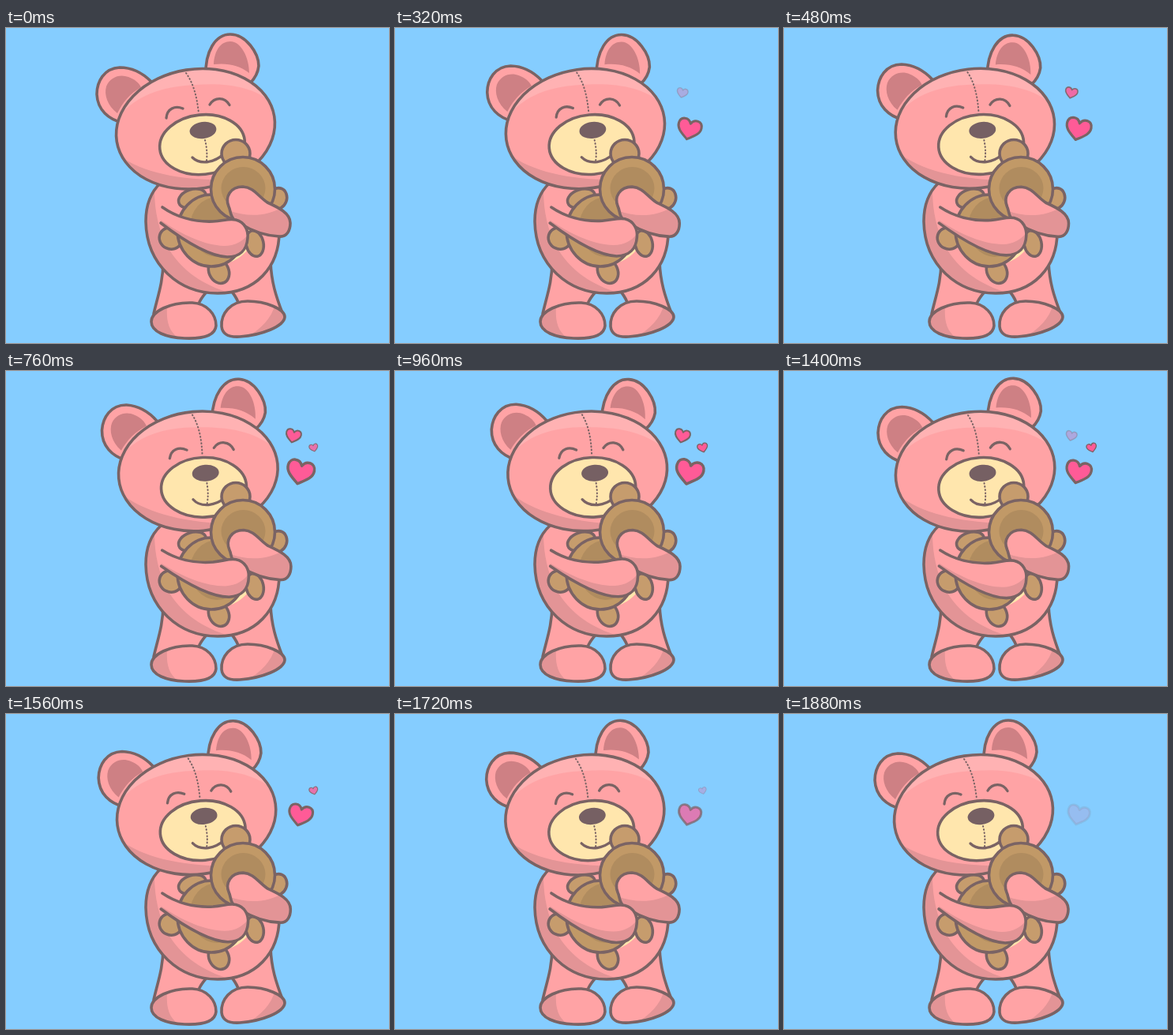
An HTML page with a canvas that plays this animation: 485x399 px, repeating every 1920 ms.

```html
<!DOCTYPE html>
<html lang="en">
<head>
<meta charset="utf-8">
<title>Bear hug</title>
<style>
html, body { margin: 0; width: 100%; height: 100%; overflow: hidden; background: #85cdff; }
canvas { display: block; }
</style>
</head>
<body>
<canvas id="stage" width="485" height="399"></canvas>
<script>
const ctx = document.getElementById('stage').getContext('2d');
const LOOP = 1920, STEP = 40;
const SKY = '#85cdff', LINE = '#7a6364', PINK = '#ffa3a5', LIGHT = '#ffb2b3', SHADE = '#e39496',
      EAR = '#ce8084', CREAM = '#ffe6ad', TAN = '#c69c6d', BROWN = '#c19967',
      DARK = '#b08c5f', ROSE = '#ff5b97';

const path = d => new Path2D(d);
function oval(x, y, rx, ry = rx, deg = 0) {
  const p = new Path2D();
  p.ellipse(x, y, rx, ry, deg * Math.PI / 180, 0, Math.PI * 2);
  return p;
}
function line(p, width = 3.6, dash = []) {
  ctx.strokeStyle = LINE;
  ctx.lineWidth = width;
  ctx.setLineDash(dash);
  ctx.stroke(p);
  ctx.setLineDash([]);
}
function fill(p, color) {
  ctx.fillStyle = color;
  ctx.fill(p);
}
// Fill, inner patches clipped to the shape, then its outline
function shape(p, color, patches = [], edge = p) {
  fill(p, color);
  ctx.save();
  ctx.clip(p);
  for (const [q, c] of patches) fill(q, c);
  ctx.restore();
  line(edge);
}
function turned(deg, x, y, draw) {
  ctx.save();
  ctx.translate(x, y);
  ctx.rotate(deg * Math.PI / 180);
  ctx.translate(-x, -y);
  draw();
  ctx.restore();
}

const legL = path('M199 296 C199 322 192 340 187 362 L240 366 C241 351 247 341 258 330 Z');
const legR = path('M335 296 C336 322 342 340 350 361 L296 366 C298 351 292 341 283 330 Z');
const footL = path('M184 372 C184 359 208 347 236 348 C255 349 266 363 266 377 C265 389 252 394 226 393 C203 392 184 385 184 372 Z');
const footR = path('M273 378 C272 362 284 346 306 346 C329 346 353 356 353 366 C352 378 324 389 296 391 C280 392 274 387 273 378 Z');
const footShadeL = path('M180 350 L204 350 C203 370 204 386 225 397 L180 397 Z');
const footShadeR = path('M358 347 L341 350 C335 370 322 382 300 395 L358 395 Z');

const body = path('M196 196 C183 208 177 225 177 245 C178 301 220 336 268 336 C316 336 346 303 346 258 C346 224 326 190 262 178 Z');
const bodyShade = path('M170 190 L188 200 C187 263 212 316 288 337 L288 345 L170 345 Z');

function lower() {
  shape(legL, PINK);
  shape(legR, PINK);
  shape(footL, PINK, [[footShadeL, SHADE]]);
  shape(footR, PINK, [[footShadeR, SHADE]]);
  shape(body, PINK, [[bodyShade, SHADE], [oval(265, 255, 50, 45), CREAM]]);
}

const earL = path('M184 68 C172 56 158 50 144 50 C124 51 115 68 115 84 C116 104 130 116 148 120 Z');
const earInL = path('M141 108 C128 98 124 84 127 74 C132 62 144 58 155 62 C163 65 168 69 171 75 C157 83 148 94 141 108 Z');
const earR = path('M253 60 C252 30 265 8 284 8 C304 8 320 32 320 48 C319 58 315 64 309 70 Z');
const earInR = path('M263 46 C264 28 272 17 284 17 C298 17 308 38 308 57 C295 47 280 44 263 46 Z');
const skull = oval(240, 127.8, 101, 75.6, -9);
const glow = path('M135 125 C155 88 194 74 240 72 C280 69 313 75 335 93 L330 40 L130 40 Z');
const jaw = path('M130 150 C155 176 200 192 270 192 L330 184 L300 215 L130 215 Z');
const dots = [.8, 3.4];

function head() {
  shape(earL, PINK, [[earInL, EAR]]);
  shape(earR, PINK, [[earInR, EAR]]);
  shape(skull, PINK, [[glow, LIGHT], [jaw, SHADE]]);
  line(path('M228 57 C238 71 242 89 244 108'), 2, dots);
  line(path('M203 114 C204 102 214 98 224 102'), 3.3);
  line(path('M258 97 C264 87 277 87 283 97.5'), 3.3);
  shape(oval(248.5, 147.7, 54, 37.8, -6), CREAM);
  line(path('M252 142 C254 150 255 158 254 168'), 2, dots);
  line(path('M236 164 C241 169 249 170.5 256 169.5 C264 168 270 165 275 160'), 3.3);
  fill(oval(249.5, 129.5, 17, 10.5, -8), '#766063');
}

function cub() {
  shape(oval(236, 216, 18, 11.5, -18), TAN);
  shape(oval(208.5, 266.5, 14.5, 13.5, 25), TAN);
  shape(oval(269.5, 308, 12.5, 16, -25), TAN);
  shape(oval(315, 273, 11, 16.5, -12), TAN);
  shape(oval(260, 256.5, 43, 45.5), BROWN, [[oval(267, 252, 34, 38), DARK]]);
  shape(oval(344, 216, 11.5, 13.5, 20), TAN);
  shape(oval(291, 159, 18, 17.5), TAN);
  shape(oval(300, 204, 40.5), BROWN, [[oval(300.5, 203, 28, 27), DARK]]);
}

const armR = path('M290 244 C283 238 285 232 282 226 C277 214 284 201 300 201 C314 202 319 213 331 221 C344 227 360 234 360 247 C360 256 356 265 346 264 C326 263 308 255 297 248 Z');
const armShadeR = path('M282 231 C303 239 330 240 351 226 L370 240 L350 275 L284 265 Z');
const armEdgeL = path('M198 227 C215 239 238 246 262 245 C276 244 283 241 291 243 C303 246 307 257 306 266 C305 281 296 290 280 290 C256 289 226 270 196 247');
const armShadeL = path('M190 239 C220 261 250 275 276 276 C291 276 300 270 308 260 L310 300 L190 300 Z');

const love = path('M0 15 C-8 9 -17 4 -16.5 -5 C-16 -15 -4 -16 0 -7.5 C4 -16 16 -15 16.5 -5 C17 4 8 9 0 15 Z');
const hearts = [
  { x: 372.7, y: 127.7, size: 1.05, low: .8, tilt: 14, from: 0, to: 1920, fade: 280 },
  { x: 363.8, y: 82, size: .59, low: .7, tilt: 14, from: 240, to: 1490, fade: 280 },
  { x: 389.6, y: 97, size: .42, low: .7, tilt: -14, from: 520, to: 1800, fade: 300 }
];

const swell = u => (1 - Math.cos(u * Math.PI * 2)) / 2;

function heart(h, t) {
  if (t <= h.from || t >= h.to) return;
  const s = h.size * (h.low + (1 - h.low) * swell((t - h.from) / (h.to - h.from)));
  ctx.save();
  ctx.globalAlpha = Math.min(1, (t - h.from) / h.fade, (h.to - t) / h.fade);
  ctx.translate(h.x, h.y);
  ctx.rotate(h.tilt * Math.PI / 180);
  ctx.scale(s, s);
  fill(love, ROSE);
  line(love, 3.4);
  ctx.restore();
}

function draw(t) {
  const k = swell(t / LOOP);
  fill(path('M0 0H485V399H0Z'), SKY);
  ctx.lineCap = ctx.lineJoin = 'round';
  lower();
  turned(4.2 * k, 255, 178, head);
  cub();
  ctx.save();
  ctx.translate(k, k * .5);
  shape(armR, PINK, [[armShadeR, SHADE]]);
  ctx.restore();
  turned(-3 * k, 200, 235, () => shape(armEdgeL, PINK, [[armShadeL, SHADE]]));
  hearts.forEach(h => heart(h, t));
}

const start = performance.now();
function tick() {
  const t = (performance.now() - start) % LOOP;
  draw(Math.floor(t / STEP) * STEP);
  requestAnimationFrame(tick);
}
tick();
</script>
</body>
</html>
```
